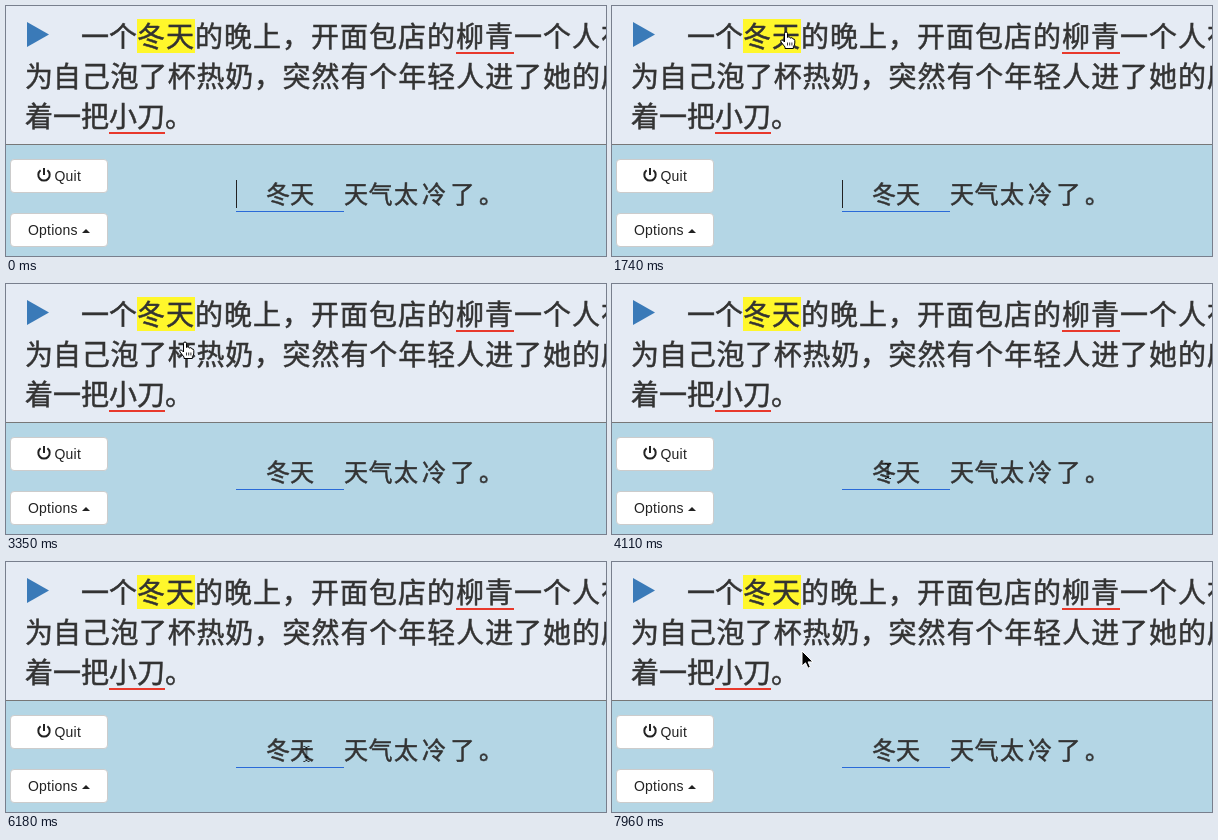
An HTML page for the animation above (8 s loop, 600x250 px).

```html
<!DOCTYPE html>
<html lang="zh-CN">
<head>
<meta charset="utf-8">
<title>Reading exercise</title>
<style>
html, body { margin: 0; width: 100%; height: 100%; overflow: hidden; background: #b4d6e5; }
svg { display: block; width: 600px; height: 250px; }
text { fill: #333; white-space: pre; }
.zh { font-family: "Noto Sans CJK SC", "Noto Sans CJK", sans-serif; stroke: #333; stroke-width: .5; }
.story { font-size: 28px; }
.answer { font-size: 24px; }
.label { font: 14px "Liberation Sans", Arial, sans-serif; letter-spacing: .2px; fill: #222; }
.button { fill: #fff; stroke: #ccc; }
.name { fill: #e8392c; }

.caret { animation: blink 8s step-end infinite; }
.cursor { animation: move 8s linear infinite; }
.arrow { animation: arrow 8s step-end infinite; }
.hand { animation: hand 8s step-end infinite; }
.beam { animation: beam 8s step-end infinite; }

@keyframes blink {
  0%, 8.87%, 21.1%, 33%, 45%, 56.6%, 68.7%, 80.6%, 93.25% { opacity: 1; }
  3%, 15%, 26.9%, 39%, 51.1%, 62.9%, 74.9%, 86.6%, 99.5% { opacity: 0; }
}
@keyframes arrow {
  0%, 42.6%, 58.7%, 93.6% { opacity: 1; }
  11%, 48.4%, 62.6% { opacity: 0; }
}
@keyframes hand {
  0%, 42.6% { opacity: 0; }
  11% { opacity: 1; }
}
@keyframes beam {
  0%, 58.7%, 93.6% { opacity: 0; }
  48.4%, 62.6% { opacity: 1; }
}
@keyframes move {
  0%, 8.2% { transform: translate(196px, -30px); }
  8.9% { transform: translate(193px, -12px); }
  10.8% { transform: translate(180px, 12px); }
  13.1% { transform: translate(150px, 29px); }
  15.2% { transform: translate(132px, 31px); }
  18.5% { transform: translate(162px, 29px); }
  21.75%, 22.3% { transform: translate(174px, 26px); }
  25.4% { transform: translate(133px, 30px); }
  28.5% { transform: translate(158px, 23px); }
  31.2% { transform: translate(174px, 29px); }
  35.25%, 38.9% { transform: translate(156px, 25px); }
  40% { transform: translate(137px, 38px); }
  41.87%, 42.5% { transform: translate(179px, 58px); }
  45% { transform: translate(216px, 110px); }
  48.5% { transform: translate(269px, 173px); }
  51.37%, 56.4% { transform: translate(276px, 187px); }
  58.7% { transform: translate(284px, 204px); }
  60.7% { transform: translate(304px, 207px); }
  63.2% { transform: translate(321px, 194px); }
  66% { transform: translate(308px, 180px); }
  68%, 68.7% { transform: translate(278px, 184px); }
  70.5% { transform: translate(264px, 174px); }
  73.5% { transform: translate(300px, 180px); }
  75.2% { transform: translate(313px, 196px); }
  77.2% { transform: translate(301px, 192px); }
  80.2% { transform: translate(272px, 189px); }
  83.2% { transform: translate(299px, 184px); }
  86.6%, 87.3% { transform: translate(289px, 185px); }
  89.5%, 93.1% { transform: translate(258px, 182px); }
  95% { transform: translate(238px, 150px); }
  97.5% { transform: translate(206px, 107px); }
  99.5%, 100% { transform: translate(190px, 89px); }
}
</style>
</head>
<body>
<svg viewBox="0 0 600 250">
  <rect width="600" height="138" fill="#e5ebf4"/>
  <rect y="138" width="600" height="1" fill="#777"/>
  <path d="M21 16L43 28.5L21 41Z" fill="#3a7ab8"/>

  <rect x="131" y="13" width="58" height="34" fill="#fff72b"/>
  <g class="zh story">
    <text x="75" y="41">一个</text>
    <text x="131" y="41" letter-spacing="1">冬天的晚上，开面包店的柳青一个人在</text>
    <text x="19 47" y="81" letter-spacing=".7">为自己泡了杯热奶，</text>
    <text x="276.5" y="81" letter-spacing=".95">突然有个年轻人进了她的店</text>
    <text x="19" y="121">着一把小刀。</text>
  </g>
  <rect class="name" x="450" y="46" width="58" height="2"/>
  <rect class="name" x="103" y="126" width="56" height="2"/>

  <rect class="button" x="4.5" y="153.5" width="97" height="33" rx="3.5"/>
  <rect class="button" x="4.5" y="207.5" width="97" height="33" rx="3.5"/>
  <path d="M34.6 164.3a5.7 5.7 0 1 0 6.8 0M38 162v7" fill="none" stroke="#222" stroke-width="2"/>
  <text class="label" x="48.5" y="175">Quit</text>
  <text class="label" x="22" y="229">Options</text>
  <path d="M76 227l4-4 4 4z" fill="#222"/>

  <g class="zh answer">
    <text x="260" y="197">冬天</text>
    <text x="338 362.5 388 416 444.5 473" y="197">天气太冷了。</text>
  </g>
  <rect x="230" y="205" width="108" height="1" fill="#2a6ad8"/>
  <rect class="caret" x="230" y="174" width="1" height="28" fill="#222"/>

  <g class="cursor">
    <path class="arrow" d="M0 0V15L3.5 11.8L6 17.2L8.4 16.2L6.1 10.9H11Z" stroke="#fff"/>
    <g class="hand" stroke="#000" stroke-linejoin="round">
      <path d="M-1.5 10V1.5Q-1.5 0 0 0Q1.5 0 1.5 1.5V5.5Q2 4.6 3.2 4.9Q4.2 5.1 4.3 6.2Q5 5.4 6 5.8Q6.8 6.1 6.9 7Q8.8 6.6 8.8 8.6V11Q8.8 13.2 7.4 14.5V16.5H-1V15L-5 10Q-5.8 8.6 -4.7 8Q-3.5 7.4 -1.5 10Z" fill="#fff"/>
      <path d="M1.5 10.5V13.5M3.7 10.5V13.5M5.9 10.5V13.5" stroke-width=".8"/>
    </g>
    <path class="beam" d="M-3 -7.5H-1.5L0 -6L1.5 -7.5H3M0 -6V6M-3 7.5H-1.5L0 6L1.5 7.5H3M-2 3H2" fill="none" stroke="#111"/>
  </g>
</svg>
</body>
</html>
```
